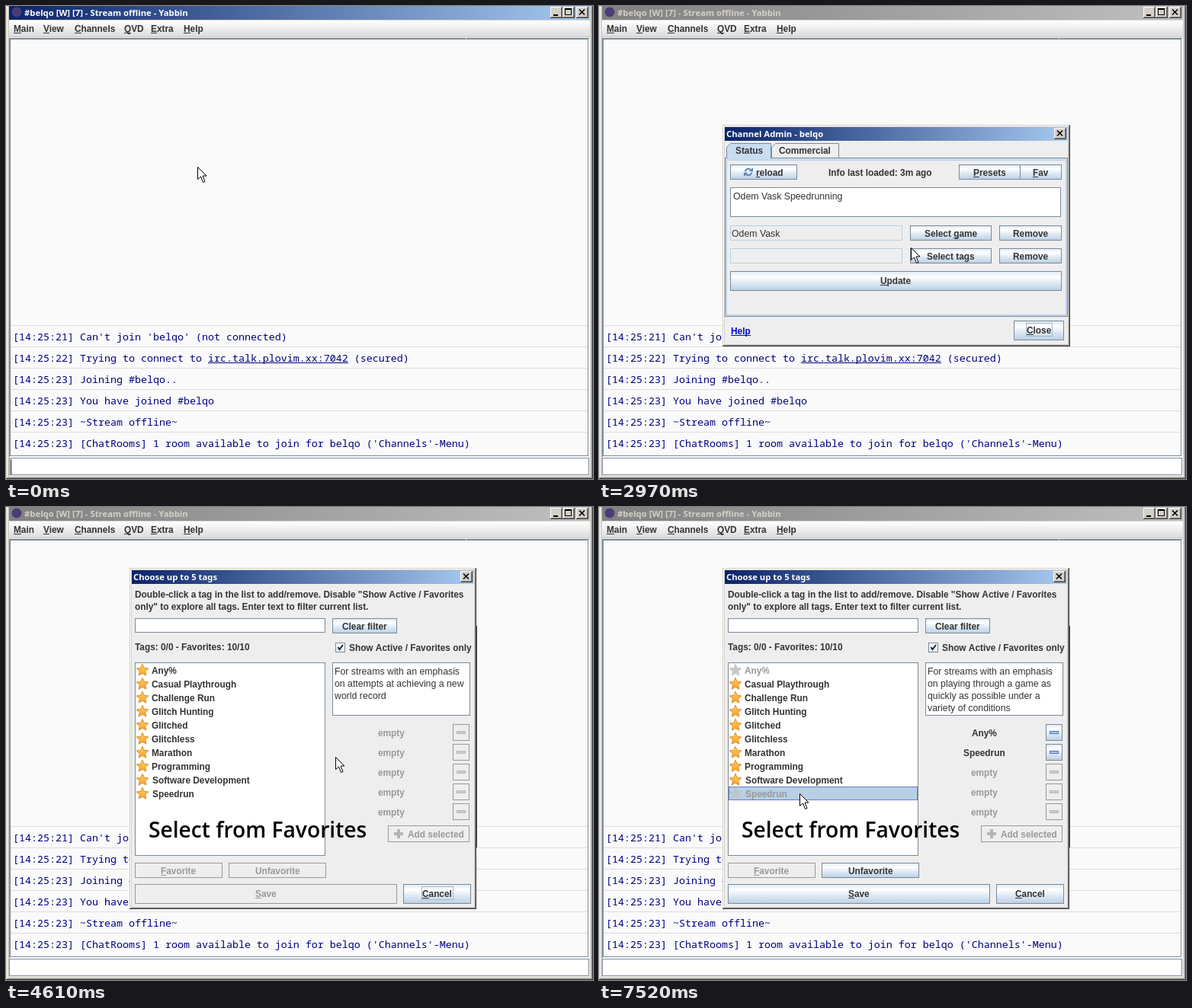
An HTML page with a canvas that plays this animation: 770 by 621 pixels, repeating every 8000 ms.

```html
<!DOCTYPE html>
<html lang="en">
<head>
<meta charset="utf-8">
<title>Selecting tags</title>
<style>
html, body { margin: 0; width: 100%; height: 100%; overflow: hidden; }
canvas { display: block; }
</style>
</head>
<body>
<canvas id="stage" width="770" height="621"></canvas>
<script>
const ctx = document.getElementById('stage').getContext('2d');
const LOOP = 8000;

const SANS = '"Liberation Sans", Arial, sans-serif';
const BOLD = `bold 11.85px ${SANS}`, PLAIN = `12.3px ${SANS}`;
const TITLE = 'bold 11.3px "Noto Sans", sans-serif';
const MONO = '13.33px "Noto Sans Mono", monospace';
const CAPTION = '600 28.2px "Open Sans", "Noto Sans", sans-serif';

const FACE = '#eeeeee', EDGE = '#7a8a99', TEXT = '#333333', GREY = '#999999';
const LIGHT = '#b8cfe5', BLUE = '#6382bf', WINDOW = '#d4d0c8';

// When things happen, in ms
const T = { caretOff: 390, menu: 710, admin: 2030, loaded: 3210, press: 3680, tags: 3830,
  caption: 4610, pick1: 5940, add1: 6100, pick2: 7280, add2: 7440 };
const CLICKS = [[550, 710], [1880, 2030], [3680, 3830],
  [5940, 6020], [6100, 6180], [7280, 7360], [7440, 7520]];

const linear = p => p;
const easeOut = p => 1 - (1 - p) ** 2.3;
const smooth = p => p * p * (3 - 2 * p);
const soft = p => (p + smooth(p)) / 2;
// first step, last step, number of steps, x, y, easing
const MOVES = [
  [940, 1180, 4, 275, 243, soft],
  [1410, 1410, 1, 270, 243, linear],
  [2570, 3370, 11, 436, 331, easeOut],
  [4610, 5400, 11, 266, 205, smooth],
  [5550, 5630, 2, 268, 212, linear],
  [6330, 7120, 11, 263, 376, soft]
];

const TAGS = ['Any%', 'Casual Playthrough', 'Challenge Run', 'Glitch Hunting', 'Glitched',
  'Glitchless', 'Marathon', 'Programming', 'Software Development', 'Speedrun'];
const ABOUT = {
  '-1': ['on attempts at achieving a new', 'world record'],
  0: ['on completing a game as', 'quickly as possible without', 'restriction'],
  9: ['on playing through a game as', 'quickly as possible under a', 'variety of conditions']
};
const CHAT = [
  "[14:25:21] Can't join 'belqo' (not connected)",
  '[14:25:22] Trying to connect to irc.talk.plovim.xx:7042 (secured)',
  '[14:25:23] Joining #belqo..',
  '[14:25:23] You have joined #belqo',
  '[14:25:23] ~Stream offline~',
  "[14:25:23] [ChatRooms] 1 room available to join for belqo ('Channels'-Menu)"
];
// label, baseline, has submenu
const MENU = [['Channel Info', 229], ['Channel Admin', 250], ['Plovim &Stream', 275, 1],
  ['Castomindler', 296, 1], ['Test', 317], ['Test2', 338], ['Miscellaneous', 363, 1],
  ['Close Channel', 388], ['Uptime', 413], ['SA', 438, 1], ['QNO Winter', 459]];

function fill(x, y, w, h, color) {
  ctx.fillStyle = color;
  ctx.fillRect(x, y, w, h);
}

function box(x, y, w, h, color, edge = EDGE) {
  fill(x, y, w, h, edge);
  fill(x + 1, y + 1, w - 2, h - 2, color);
}

function outline(x, y, w, h, color) {
  ctx.strokeStyle = color;
  ctx.lineWidth = 1;
  ctx.strokeRect(x + .5, y + .5, w - 1, h - 1);
}

function shape(points, color, edge) {
  ctx.beginPath();
  points.forEach(([x, y]) => ctx.lineTo(x, y));
  ctx.closePath();
  ctx.fillStyle = color;
  ctx.fill();
  if (edge) {
    ctx.strokeStyle = edge;
    ctx.lineWidth = 1;
    ctx.stroke();
  }
}

function disc(x, y, r, color) {
  ctx.beginPath();
  ctx.arc(x, y, r, 0, 7);
  ctx.fillStyle = color;
  ctx.fill();
}

function gradient(x0, y0, x1, y1, ...stops) {
  const g = ctx.createLinearGradient(x0, y0, x1, y1);
  stops.forEach(([at, color]) => g.addColorStop(at, color));
  return g;
}

// "&" underlines the character after it
function label(s, x, y, { font = BOLD, color = TEXT, center = false } = {}) {
  const mark = s.indexOf('&');
  s = s.replace('&', '');
  ctx.font = font;
  const width = ctx.measureText(s).width;
  if (center) x = Math.round(x - width / 2);
  ctx.fillStyle = color;
  ctx.fillText(s, x, y);
  if (mark >= 0) {
    const left = ctx.measureText(s.slice(0, mark)).width;
    ctx.fillRect(Math.round(x + left), y + 1, Math.round(ctx.measureText(s[mark]).width), 1);
  }
  return width;
}

function button(x, y, w, h, text, { on = true, pressed, hover, focus, textX = x + w / 2 } = {}) {
  const glow = gradient(0, y, 0, y + h, [0, '#dde8f3'], [.3, '#ffffff'], [.6, '#dde8f3'], [1, LIGHT]);
  box(x, y, w, h, !on ? FACE : pressed ? LIGHT : glow, on ? EDGE : GREY);
  if (pressed) outline(x + 1, y + 1, w - 2, h - 2, EDGE);
  if (hover) [LIGHT, EDGE, LIGHT].forEach((c, i) => outline(x + i, y + i, w - 2 * i, h - 2 * i, c));
  const base = y + Math.round(h / 2) + 5 - (h > 24);
  const width = label(text, textX, base, { color: on ? TEXT : GREY, center: true });
  if (focus) outline(Math.round(textX - width / 2) - 1, base - 14, Math.round(width) + 3, 18, '#a3b8cc');
}

function bevel(x, y, w, h, outer, inner) {
  fill(x, y, w, h, '#404040');
  fill(x, y, w - 1, h - 1, outer);
  fill(x + 1, y + 1, w - 2, h - 2, '#808080');
  fill(x + 1, y + 1, w - 3, h - 3, inner);
  fill(x + 2, y + 2, w - 4, h - 4, WINDOW);
}

function captionButton(x, y, kind) {
  bevel(x, y, 16, 15, '#ffffff', WINDOW);
  if (kind === 'min') fill(x + 4, y + 10, 6, 2, '#000');
  if (kind === 'max') {
    box(x + 3, y + 2, 9, 9, WINDOW, '#000');
    fill(x + 3, y + 2, 9, 2, '#000');
  }
  if (kind === 'close') {
    ctx.strokeStyle = '#000';
    ctx.lineWidth = 1.6;
    ctx.beginPath();
    ctx.moveTo(x + 4, y + 3.5); ctx.lineTo(x + 11, y + 10.5);
    ctx.moveTo(x + 11, y + 3.5); ctx.lineTo(x + 4, y + 10.5);
    ctx.stroke();
  }
}

function titleBar(x, y, w, text, textX, active = true) {
  const [from, to] = active ? ['#0a246a', '#a6caf0'] : ['#808080', '#c0c0c0'];
  fill(x, y, w, 18, gradient(x, 0, x + w, 0, [0, from], [1, to]));
  label(text, textX, y + 13, { font: TITLE, color: active ? '#ffffff' : WINDOW });
}

function dialog(x, y, w, h, text) {
  bevel(x, y, w, h, WINDOW, '#ffffff');
  fill(x + 3, y + 21, w - 6, h - 24, FACE);
  titleBar(x + 3, y + 3, w - 7, text, 167);
  captionButton(x + w - 21, y + 4, 'close');
}

function mainWindow(t) {
  const active = t < T.admin;
  bevel(0, -4, 770, 625, WINDOW, '#ffffff');
  titleBar(4, 0, 762, '#belqo [W] [7] - Stream offline - Yabbin', 24, active);
  disc(14, 8, 6.5, '#4b3c78');
  captionButton(714, 1, 'min');
  captionButton(730, 1, 'max');
  captionButton(748, 1, 'close');
  fill(4, 19, 762, 22, gradient(0, 19, 0, 41, [0, '#ffffff'], [1, '#dadada']));
  fill(4, 40, 762, 1, '#cccccc');
  fill(4, 41, 762, 1, FACE);
  [['&Main', 10], ['&View', 49], ['&Channels', 90], ['&QVD', 155], ['&Extra', 190], ['&Help', 233]]
    .forEach(([s, x]) => label(s, x, 34));

  // Sunken panes: dark lines with a white lower right edge
  fill(4, 42, 762, 575, '#ffffff');
  fill(4, 42, 761, 1, EDGE);
  fill(4, 42, 1, 550, EDGE);
  box(5, 43, 759, 548, '#fafafa');
  fill(603, 42, 1, 1, '#ffffff');
  CHAT.forEach((line, i) => {
    fill(6, 419 + 28 * i, 757, 1, '#dddddd');
    label(line, 9, 439 + 28 * i, { font: MONO, color: '#000080' });
  });
  fill(265, 468, 184, 1, '#000080');
  box(4, 593, 761, 23, '#ffffff');
  if (t < T.caretOff) fill(6, 595, 1, 20, '#000');
}

function popupMenu(y) {
  box(251, 211, 127, 256, FACE);
  const row = y < 214 ? -1 : y < 235 ? 0 : 1;
  if (row >= 0) fill(252, 214 + 21 * row + row, 125, 21, '#a3b8cc');
  [257, 345, 370, 395, 420].forEach(sepY => {
    fill(252, sepY, 125, 1, BLUE);
    fill(252, sepY + 1, 125, 1, '#ffffff');
  });
  MENU.forEach(([s, base, more]) => {
    label(s, 278, base);
    if (more) shape([[367, base - 9], [371.5, base - 4.5], [367, base]], TEXT);
  });
  fill(259, 284, 14, 14, '#1f2b20');
}

function reloadIcon(x, y) {
  ctx.strokeStyle = '#5d86b5';
  ctx.lineWidth = 2;
  for (const turn of [0, Math.PI]) {
    ctx.save();
    ctx.translate(x, y);
    ctx.rotate(turn);
    ctx.beginPath();
    ctx.arc(0, 0, 4.2, Math.PI * 1.05, Math.PI * 1.8);
    ctx.stroke();
    shape([[6, -6], [6, -.5], [.8, -1]], '#5d86b5');
    ctx.restore();
  }
}

function adminDialog(t, x) {
  dialog(162, 156, 456, 291, 'Channel Admin - belqo');
  const tab = (left, right, color) => shape([[left, 199.5], [left, 185.5], [left + 5, 180.5],
    [right, 180.5], [right, 199.5]], color, EDGE);
  tab(226.5, 314.5, FACE);
  box(165, 199, 450, 209, '#c8ddf2');
  box(167, 202, 446, 204, FACE, LIGHT);
  tab(167.5, 225.5, '#c8ddf2');
  fill(168, 199, 57, 2, '#c8ddf2');
  label('Status', 197, 194, { center: true });
  label('Commercial', 270, 194, { center: true });

  button(172, 208, 88, 20, '&reload', { textX: 224 });
  reloadIcon(196, 218);
  label(`Info last loaded: ${t < T.loaded ? 3 : 4}m ago`, 301, 223);
  button(472, 208, 81, 20, '&Presets');
  button(552, 208, 55, 20, '&Fav');
  box(172, 238, 434, 39, '#ffffff');
  label('Odem Vask Speedrunning', 176, 254, { font: PLAIN });
  box(172, 288, 226, 20, FACE, LIGHT);
  box(172, 318, 226, 20, FACE, LIGHT);
  label('Odem Vask', 174, 303, { font: PLAIN });
  const pressed = t >= T.press;
  button(408, 288, 107, 20, 'Select &game');
  button(408, 318, 107, 20, 'Select tags', { pressed, focus: pressed, hover: !pressed && x > 412 });
  button(525, 288, 82, 20, 'Remove');
  button(525, 318, 82, 20, 'Remove');
  button(172, 348, 435, 26, '&Update');
  label('Help', 173, 431, { color: '#0000ee' });
  fill(173, 432, 26, 1, '#0000ee');
  button(544, 413, 66, 26, '&Close', { focus: !pressed });
}

function star(x, y, color, edge) {
  shape(Array.from({ length: 10 }, (_, i) => {
    const r = i % 2 ? 3.8 : 8.2, a = Math.PI * (i / 5 - .5);
    return [x + r * Math.cos(a), y + r * Math.sin(a)];
  }), color, edge);
}

function tagDialog(t) {
  const selected = t >= T.pick2 ? 9 : t >= T.pick1 ? 0 : -1;
  const added = [];
  if (t >= T.add1) added.push(0);
  if (t >= T.add2) added.push(9);

  dialog(162, 80, 455, 448, 'Choose up to 5 tags');
  label('Double-click a tag in the list to add/remove. Disable "Show Active / Favorites', 169, 119);
  label('only" to explore all tags. Enter text to filter current list.', 169, 135);
  box(169, 146, 250, 19, '#ffffff');
  button(428, 146, 85, 20, 'Clear filter');
  label('Tags: 0/0 - Favorites: 10/10', 169, 188);
  box(432, 178, 13, 13, gradient(0, 178, 0, 191, [0, '#ffffff'], [1, '#dde8f3']));
  ctx.strokeStyle = '#222';
  ctx.lineWidth = 2;
  ctx.beginPath();
  ctx.moveTo(435.5, 184); ctx.lineTo(437.5, 187); ctx.lineTo(442, 181);
  ctx.stroke();
  label('Show Active / Favorites only', 450, 189);

  box(169, 204, 250, 254, '#ffffff');
  TAGS.forEach((tag, i) => {
    const y = 205 + 18 * i, used = added.includes(i), chosen = i === selected;
    if (chosen) box(170, y, 248, 18, LIGHT, BLUE);
    const color = !used ? gradient(0, y, 0, y + 18, [0, '#ffd873'], [1, '#f59a1c'])
      : chosen ? '#bcc6cf' : '#c8c8c8';
    star(179, y + 9.5, color, used ? color : '#e08a1e');
    label(tag, i > 7 ? 192 : 191, y + 14, { color: used ? GREY : TEXT });
  });

  box(428, 204, 181, 70, '#ffffff');
  ['For streams with an emphasis', ...ABOUT[selected]]
    .forEach((s, i) => label(s, 431, 220 + 16 * i, { font: PLAIN }));
  for (let i = 0; i < 5; i++) {
    const y = 285 + 26 * i, on = i < added.length;
    label(on ? TAGS[added[i]] : 'empty', 505.5, y + 16, { color: on ? TEXT : GREY, center: true });
    button(586, y, 22, 22, '', { on });
    box(591, y + 9, 12, 4, on ? '#a9c4ee' : '#cccccc', on ? '#4a74b8' : '#bbbbbb');
  }
  const canAdd = selected >= 0 && !added.includes(selected);
  button(501, 418, 107, 22, 'Add selected', { on: canAdd, textX: 563.5 });
  const plus = canAdd ? '#4a74b8' : '#b4b4b4';
  fill(509, 427, 12, 4, plus);
  fill(513, 423, 4, 12, plus);
  button(169, 467, 115, 20, '&Favorite', { on: false });
  button(292, 467, 128, 20, 'Unfavorite', { on: selected >= 0 });
  button(169, 495, 344, 26, '&Save', { on: added.length > 0 });
  button(521, 495, 89, 26, '&Cancel', { focus: selected < 0 });
}

function pointerAt(t) {
  let x = 251, y = 211;
  for (const [start, end, steps, toX, toY, ease] of MOVES) {
    if (t < start) break;
    const gap = (end - start) / (steps - 1) || 1;
    const p = ease(Math.min(steps, Math.floor((t - start) / gap) + 1) / steps);
    x += (toX - x) * p;
    y += (toY - y) * p;
  }
  return [Math.round(x), Math.round(y)];
}

function pointer(x, y) {
  const points = [[0, 0], [0, 16], [4, 12.5], [7, 20], [9.5, 19], [6.5, 11.5], [11.5, 11.5]];
  shape(points.map(([px, py]) => [x + px + .5, y + py + .5]), '#ffffff', '#000000');
}

function draw(t) {
  const [x, y] = pointerAt(t);
  mainWindow(t);
  if (t >= T.menu && t < T.admin) popupMenu(y);
  if (t >= T.admin) adminDialog(t, x);
  if (t >= T.tags) tagDialog(t);
  if (t >= T.caption) label('Select from Favorites', 187, 434, { font: CAPTION, color: '#000' });
  if (CLICKS.some(([from, to]) => t >= from && t < to)) disc(x, y, 12, 'rgba(230, 225, 30, .75)');
  pointer(x, y);
}

const began = performance.now();
function tick() {
  draw((performance.now() - began) % LOOP);
  requestAnimationFrame(tick);
}
tick();
</script>
</body>
</html>
```
